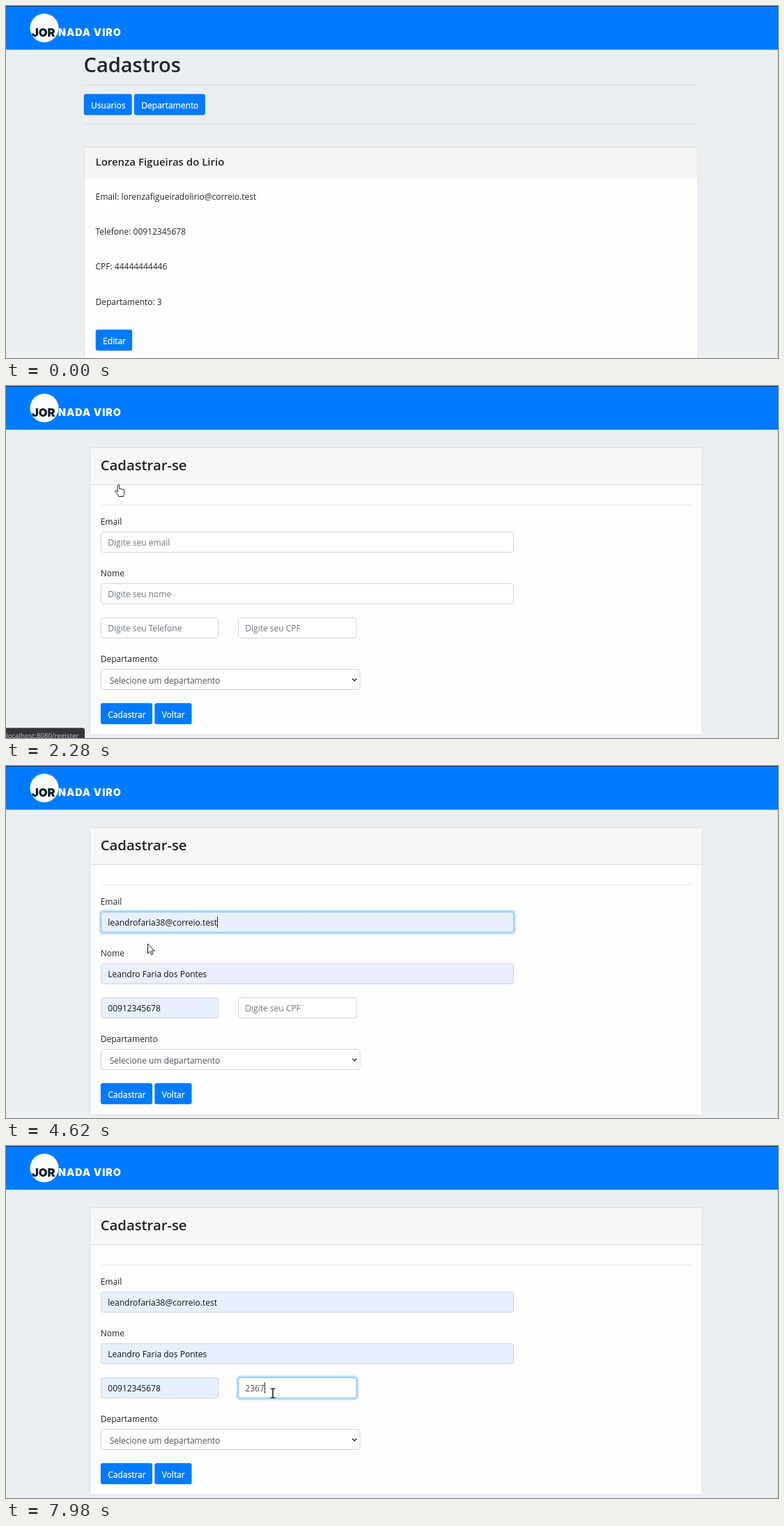
Animation, 1108 px wide and 505 px high, one loop 8 s. Source, as an HTML page with a canvas:

```html
<!DOCTYPE html>
<html lang="pt-BR">
<head>
<meta charset="utf-8">
<title>Cadastros</title>
<style>
html, body { margin: 0; width: 100%; height: 100%; overflow: hidden; background: #ebeff2; }
canvas { display: block; width: 1108px; height: 505px; }
</style>
</head>
<body>
<canvas id="stage"></canvas>
<script>
const W = 1108, H = 505, LOOP = 8000;
const canvas = document.getElementById('stage');
const ctx = canvas.getContext('2d');
const dpr = window.devicePixelRatio || 1;
canvas.width = W * dpr;
canvas.height = H * dpr;

const SANS = '"Open Sans", "Noto Sans", sans-serif';
const INK = '#212529', MUTED = '#6c757d', FIELD_INK = '#495057', BLUE = '#007bff';
const MEMBER = { name: 'Lorenza Figueiras do Lirio', email: 'lorenzafigueiradolirio@correio.test' };
const GUEST = { name: 'Leandro Faria dos Pontes', email: 'leandrofaria38@correio.test' };
const PHONE = '00912345678', CPF = '44444444446';

// Times of the hard changes
const PRESS = 1820, FORM = 2210, FOCUS = 3460, POPUP = 3620, PREVIEW = 4235,
  PICK = 4540, SWITCH = 5800, TYPE = 6890;

const FIELDS = {
  email: [136, 209, 593, 30],
  name: [136, 283, 593, 30],
  phone: [136, 332, 169, 30],
  cpf: [333, 332, 170.5, 30]
};
const POPUP_BOX = [136, 239, 180, 102];
const BUTTONS = { users: [111.7, 126.2, 69, 30.2], dept: [183.9, 126.2, 102, 30.2] };

const HAND = new Path2D('M4 11V2.2a1.4 1.4 0 0 1 2.8 0V7a1.4 1.4 0 0 1 2.6.4a1.3 1.3 0 0 1 2.4.5' +
  'a1.2 1.2 0 0 1 2.2.8V12c0 2-1.4 3-1.6 5.5H5.8C5.4 15.3 2.8 13.5 1 10.6C.2 9.3 1.9 8.4 2.9 9.6L4 11Z');
const ARROW = new Path2D('M0 0V14L3.2 11L5.2 15.8L7.4 14.9L5.4 10.2H9.8Z');

// Pointer moves, each advancing in n even steps
const easeOut = k => p => 1 - (1 - p) ** k;
const smooth = p => p * p * (3 - 2 * p);
const MOVES = [
  { t0: 120, t1: 900, n: 11, from: [985, 452], to: [219, 163], ease: smooth },
  { t0: 980, t1: 1660, n: 10, from: [219, 147], to: [161.4, 141.4], ease: easeOut(4) },
  { t0: 2440, t1: 3150, n: 10, from: [161.4, 141.4], to: [200, 228], ease: smooth },
  { t0: 3930, t1: 4390, n: 7, from: [200, 229], to: [203.5, 255], ease: easeOut(1.15) },
  { t0: 4950, t1: 5570, n: 9, from: [203.5, 255], to: [383, 355.5], ease: smooth },
  { t0: 6430, t1: 6431, n: 1, from: [383, 355.5], to: [383, 354.5], ease: smooth }
];

const ramp = (t, a, b) => Math.min(1, Math.max(0, (t - a) / (b - a)));
const inside = ([x, y], [bx, by, w, h]) => x >= bx && x <= bx + w && y >= by && y <= by + h;

function pointer(t) {
  const m = MOVES.filter(move => t >= move.t0 - 2).pop();
  if (!m) return null;
  const gap = (m.t1 - m.t0) / Math.max(1, m.n - 1);
  const step = Math.min(m.n, Math.floor((t - m.t0 + 3) / gap) + 1);
  const p = m.ease(step / m.n);
  return m.from.map((v, i) => v + (m.to[i] - v) * p);
}

function rect(x, y, w, h, color) {
  ctx.fillStyle = color;
  ctx.fillRect(x, y, w, h);
}

function rounded(x, y, w, h, r, fill, stroke) {
  ctx.beginPath();
  ctx.roundRect(x, y, w, h, r);
  if (fill) { ctx.fillStyle = fill; ctx.fill(); }
  if (stroke) { ctx.strokeStyle = stroke; ctx.lineWidth = 1; ctx.stroke(); }
}

function text(str, x, y, color = INK, size = 12, weight = 400, family = SANS) {
  ctx.font = `${weight} ${size}px ${family}`;
  ctx.fillStyle = color;
  ctx.fillText(str, x, y);
}

function ring([x, y, w, h], color, amount) {
  if (amount <= 0) return;
  ctx.globalAlpha = amount;
  ctx.strokeStyle = color;
  ctx.lineWidth = 2.5;
  ctx.beginPath();
  ctx.roundRect(x - 1.2, y - 1.2, w + 2.4, h + 2.4, 4);
  ctx.stroke();
  ctx.globalAlpha = 1;
}

function button(box, label, hover = 0, press = 0) {
  const [x, y, w, h] = box;
  ring(box, 'rgba(38,143,255,.5)', press);
  rounded(x, y, w, h, 3, BLUE);
  if (hover) rounded(x, y, w, h, 3, `rgba(0,105,217,${hover})`);
  if (press) rounded(x, y, w, h, 3, `rgba(0,98,204,${press})`);
  text(label, x + 10.4, y + 20.8, '#fff');
  // A hairline gives light text on blue its fuller weight
  ctx.strokeStyle = '#fff';
  ctx.lineWidth = .25;
  ctx.strokeText(label, x + 10.4, y + 20.8);
}

function caret(x, y) {
  rect(Math.round(x), y, 1, 16, '#222');
}

function field(box, value, hint, o = {}) {
  const [x, y, w, h] = box, focus = o.focus || 0;
  ring(box, 'rgba(0,123,255,.25)', focus);
  const edge = [x + .5, y + .5, w - 1, h - 1, 3];
  rounded(...edge, o.filled ? '#e8f0fe' : '#fff', '#ced4da');
  if (focus) {
    ctx.globalAlpha = focus;
    rounded(...edge, null, '#80bdff');
    ctx.globalAlpha = 1;
  }
  const color = o.filled ? '#111' : value ? FIELD_INK : MUTED;
  text(value || hint, x + 10.3, y + 20.3, color);
  if (o.caret) caret(x + 10.5 + (value ? ctx.measureText(value).width : 0), y + 7);
}

function navbar() {
  rect(0, 0, W, H, '#ebeff2');
  rect(0, 0, W, 62.7, BLUE);
  rect(0, 0, W, 1, '#0b3f78');
  rect(W - 1, 0, 1, H, 'rgba(0,0,0,.12)');
  ctx.beginPath();
  ctx.arc(55, 31.5, 20.5, 0, Math.PI * 2);
  ctx.fillStyle = '#fff';
  ctx.fill();
  const heavy = 'Inter, sans-serif';
  text('JOR', 37, 43.5, '#0d1b2a', 16.5, 900, heavy);
  ctx.letterSpacing = '1px';
  text('NADA VIRO', 75, 42.7, '#fff', 14.2, 900, heavy);
  ctx.letterSpacing = '0px';
}

function listPage(t) {
  text('Cadastros', 111.5, 95, INK, 29, 600);
  rect(112, 113, 881, 1, 'rgba(0,0,0,.08)');
  rect(112, 169, 881, 1, 'rgba(0,0,0,.08)');
  const deptHover = ramp(t, 960, 1040) * (1 - ramp(t, 1040, 1190));
  const press = ramp(t, PRESS - 40, PRESS + 150);
  button(BUTTONS.dept, 'Departamento', deptHover);
  button(BUTTONS.users, 'Usuarios', ramp(t, 1140, 1290), press);

  rounded(112.5, 202.5, 880, 330, 3, '#fefefe', '#e3e5e7');
  rect(113, 203, 879, 44, '#f5f5f5');
  rect(113, 202, 879, 1, '#d8dadc');
  text(MEMBER.name, 128.5, 228.5, INK, 15, 600);
  const lines = ['Email: ' + MEMBER.email, 'Telefone: ' + PHONE, 'CPF: ' + CPF, 'Departamento: 3'];
  lines.forEach((line, i) => text(line, 128.5, 278 + i * 50.2));
  button([128.7, 464.2, 52.4, 30.2], 'Editar');
}

function popup(t) {
  const [x, y, w, h] = POPUP_BOX;
  ctx.save();
  ctx.shadowColor = 'rgba(0,0,0,.35)';
  ctx.shadowBlur = 4;
  ctx.shadowOffsetY = 1;
  rounded(x, y, w, h, 4, '#292a2d');
  ctx.restore();
  if (t >= PREVIEW) rect(x, y + 7, w, 53, '#3f4043');
  text(GUEST.email, x + 11, 266.5, '#e8eaed', 10.7, 600);
  text(GUEST.name, x + 11, 284.5, '#e8eaed', 10);
  rect(x, 305, w, 1, '#3a3b3f');
  text('Gerenciar...', x + 11, 328, '#e8eaed', 10.6);
}

function typed(t) {
  return t < TYPE ? '' : t < 7520 ? '2' : t < 7980 ? '23' : '2367';
}

function formPage(t) {
  rounded(120.5, 88.5, 879, 412, 3, '#fefefe', '#dbdee0');
  rect(121, 89, 878, 52, '#f7f7f7');
  rect(121, 141, 878, 1, '#dcdddd');
  text('Cadastrar-se', 135.7, 121, INK, 20.3, 600);
  rect(136, 170, 848, 1, 'rgba(0,0,0,.08)');
  text('Email', 135.7, 199);
  text('Nome', 135.7, 273);
  text('Departamento', 135.7, 396);

  const filled = t >= PREVIEW;
  const leave = ramp(t, SWITCH, SWITCH + 150);
  const emailFocus = ramp(t, FOCUS - 40, FOCUS + 110) * (1 - leave);
  const emailCaret = (t >= FOCUS && t < 3930) || (t >= PICK && t < 5150) || (t >= 5720 && t < SWITCH);
  const cpfCaret = (t >= SWITCH && t < 6360) || (t >= TYPE && t < 7440) || t >= 7520;

  field(FIELDS.email, filled ? GUEST.email : '', 'Digite seu email', { filled, focus: emailFocus, caret: emailCaret });
  field(FIELDS.name, filled ? GUEST.name : '', 'Digite seu nome', { filled });
  field(FIELDS.phone, filled ? PHONE : '', 'Digite seu Telefone', { filled });
  field(FIELDS.cpf, typed(t), 'Digite seu CPF', { focus: leave, caret: cpfCaret });

  rounded(136.5, 406.5, 371.5, 29, 3, '#fff', '#ced4da');
  text('Selecione um departamento', 148.7, 427, FIELD_INK);
  ctx.strokeStyle = '#343a40';
  ctx.lineWidth = 1.5;
  ctx.beginPath();
  ctx.moveTo(497, 419.7);
  ctx.lineTo(500.2, 422.9);
  ctx.lineTo(503.4, 419.7);
  ctx.stroke();

  button([135.8, 455.1, 74.2, 30.2], 'Cadastrar');
  button([213.3, 455.1, 53.2, 30.2], 'Voltar');
  if (t >= POPUP && t < PICK) popup(t);
}

function statusBar(t) {
  const alpha = ramp(t, 1350, 1500) * (1 - ramp(t, 2560, 2700));
  if (!alpha) return;
  ctx.globalAlpha = alpha;
  rounded(-5, 490.5, 118, 30, 4, '#35363a');
  text('localhost:8080/register', 0, 504.5, '#c4c7cb', 9.8);
  ctx.globalAlpha = 1;
}

function pointerKind(t, at) {
  if (t < FORM) return Object.values(BUTTONS).some(b => inside(at, b)) ? 'hand' : 'arrow';
  if (t < 2438) return 'hand';
  if (t >= POPUP && t < PICK && inside(at, POPUP_BOX)) return 'arrow';
  return Object.values(FIELDS).some(b => inside(at, b)) ? 'beam' : 'arrow';
}

function drawPointer(t) {
  const at = pointer(t);
  if (!at) return;
  const kind = pointerKind(t, at);
  ctx.save();
  ctx.translate(...at);
  if (kind === 'beam') {
    rect(-.7, -6.5, 1.5, 13.5, '#111');
    rect(-3.5, -7, 7, 1.2, '#111');
    rect(-3.5, 6, 7, 1.2, '#111');
  } else {
    if (kind === 'hand') ctx.translate(-5.4, -.4);
    const shape = kind === 'hand' ? HAND : ARROW;
    ctx.fillStyle = '#fff';
    ctx.strokeStyle = '#1a1a1a';
    ctx.lineWidth = 1;
    ctx.lineJoin = 'round';
    ctx.fill(shape);
    ctx.stroke(shape);
  }
  ctx.restore();
}

function frame(now) {
  const t = now % LOOP;
  ctx.setTransform(dpr, 0, 0, dpr, 0, 0);
  navbar();
  (t < FORM ? listPage : formPage)(t);
  statusBar(t);
  drawPointer(t);
  requestAnimationFrame(frame);
}
requestAnimationFrame(frame);
</script>
</body>
</html>
```
